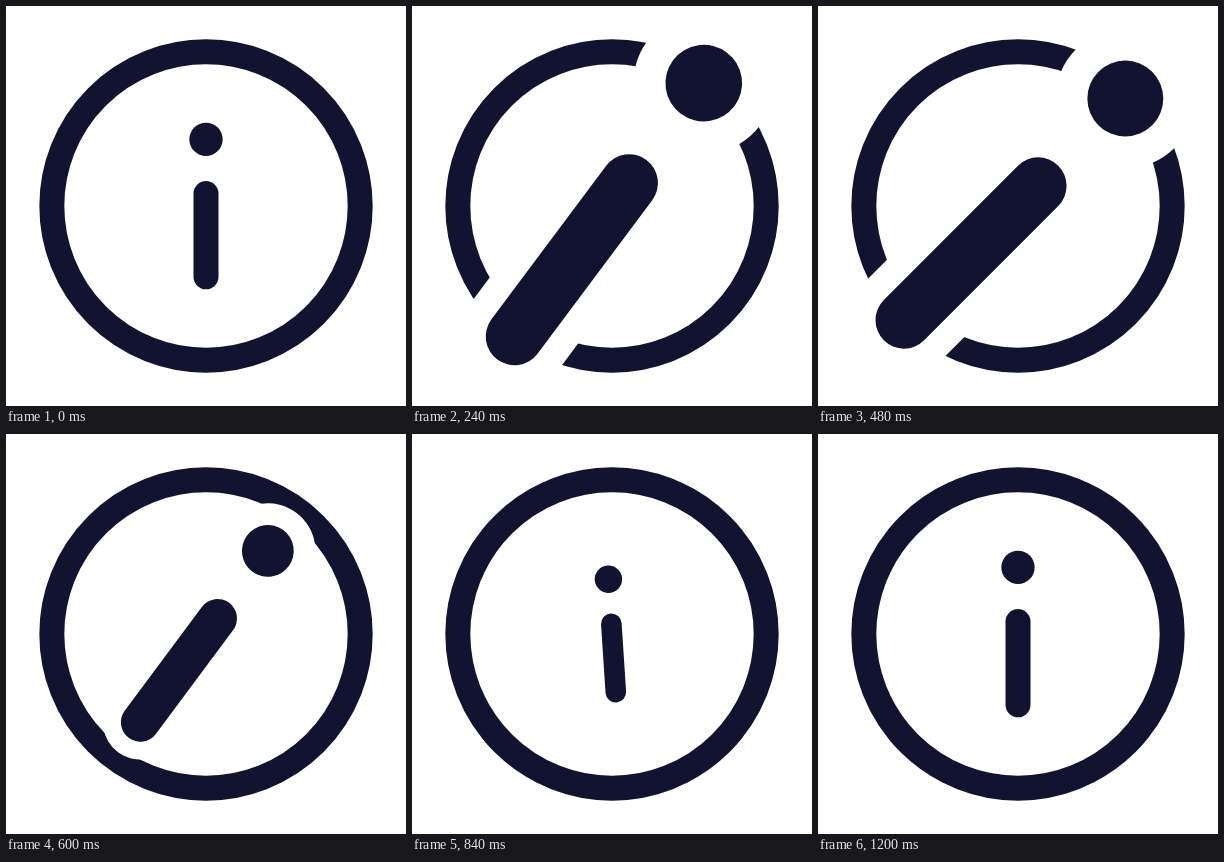
An HTML page that plays this animation: 400 by 400 pixels, repeating every 2230 ms.

```html
<!DOCTYPE html>
<html lang="en">
<head>
<meta charset="utf-8">
<title>Info icon</title>
<style>
  html, body { margin: 0; width: 100%; height: 100%; overflow: hidden; background: #fff; }
  svg { display: block; width: 100%; height: 100%; }
</style>
</head>
<body>
<svg viewBox="0 0 400 400">
  <circle cx="200" cy="200" r="154.17" fill="none" stroke="#121331" stroke-width="25"/>
  <g id="sign" stroke-linecap="round">
    <!-- white halo that cuts the ring -->
    <circle cy="-66.67" r="30.6" fill="#fff"/>
    <path d="M0 -12.5V70.83" stroke="#fff" stroke-width="48"/>
    <circle cy="-66.67" r="16.67" fill="#121331"/>
    <path d="M0 -12.5V70.83" stroke="#121331" stroke-width="25"/>
  </g>
</svg>
<script>
  const LOOP = 2230, STEP = 30, LAST = 40;
  const sign = document.getElementById('sign');

  // Keys: [step, value, ease strength on the way to this key]
  const scaleKeys = [[0, 1], [8, 2.3, 0.42], [15, 2.3, 0.42], [25, 0.808, 0.5], [40, 1, 0.42]];
  const angleKeys = [[0, 0], [11.2, 45, 0.38], [15.7, 45, 0.38], [32.2, -11.7, 0.4], [40, 0, 0.4]];

  // Symmetric cubic Bezier (k, 0, 1 - k, 1), solved by bisection
  function ease(x, k) {
    let lo = 0, hi = 1;
    for (let i = 0; i < 30; i++) {
      const p = (lo + hi) / 2, q = 1 - p;
      const bx = 3 * k * p * q * q + 3 * (1 - k) * p * p * q + p * p * p;
      if (bx < x) lo = p; else hi = p;
    }
    return lo * lo * (3 - 2 * lo);
  }

  function valueAt(keys, step) {
    for (let i = 1; i < keys.length; i++) {
      const [start, from] = keys[i - 1], [end, to, k] = keys[i];
      if (step < end) return from + (to - from) * ease((step - start) / (end - start), k);
    }
    return keys[keys.length - 1][1];
  }

  function draw(ms) {
    const step = Math.min(LAST, Math.floor((ms % LOOP) / STEP));
    const angle = valueAt(angleKeys, step), scale = valueAt(scaleKeys, step);
    sign.setAttribute('transform', `translate(200 200) rotate(${angle}) scale(${scale})`);
  }

  const begin = performance.now();
  function tick() {
    draw(performance.now() - begin);
    requestAnimationFrame(tick);
  }
  tick();
</script>
</body>
</html>
```
